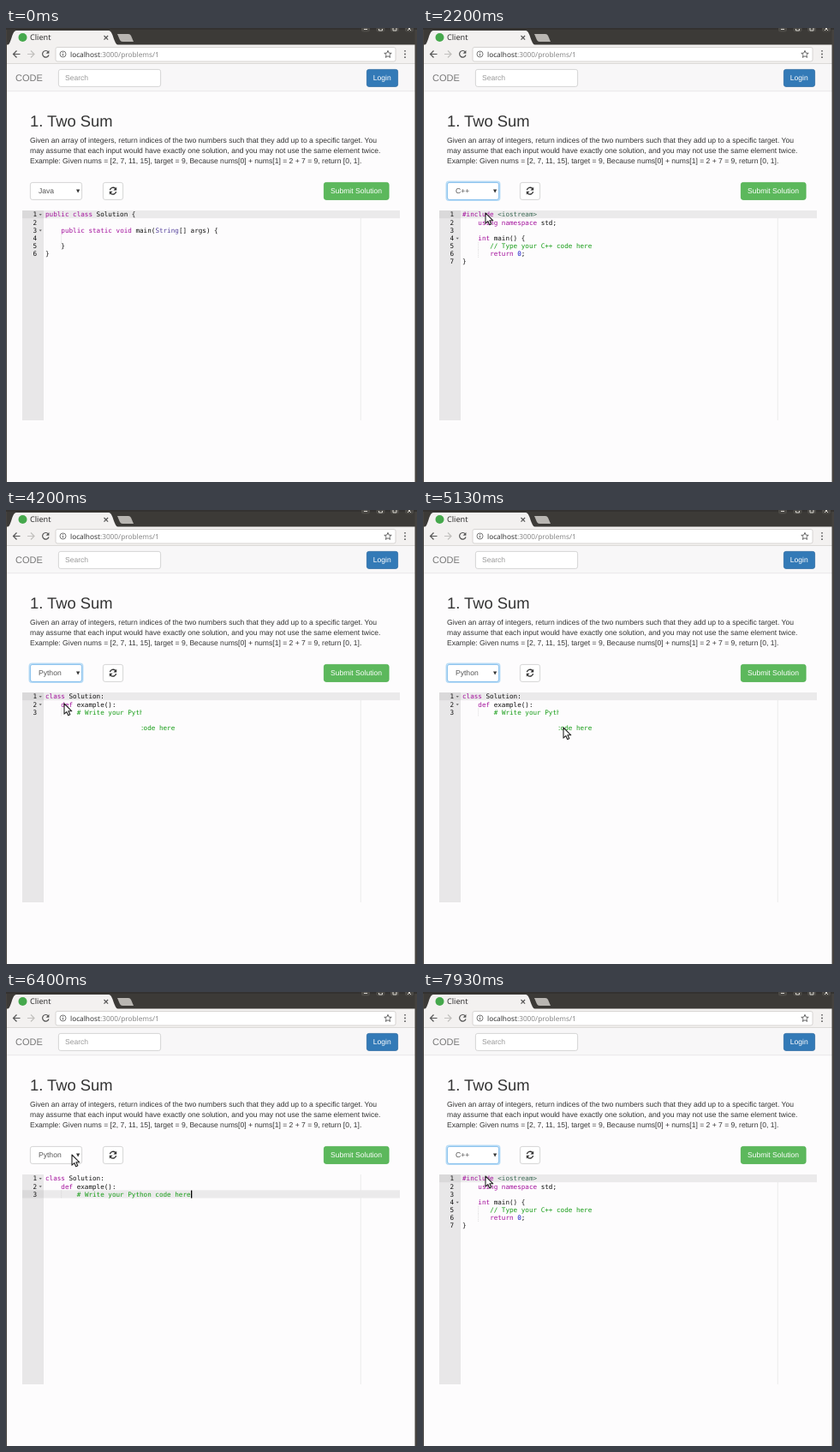
Animation, 480 px wide and 530 px high, one loop 8000 ms. Source, as an HTML page:

```html
<!DOCTYPE html>
<html>
<head>
<meta charset="utf-8">
<style>
  html, body { margin: 0; width: 100%; height: 100%; overflow: hidden; background: #fdfcfd; }
  svg { display: block; width: 480px; height: 530px; }
  text { font: 8.57px "Liberation Sans", Arial, sans-serif; fill: #333; text-rendering: geometricPrecision; white-space: pre; }
  .ui { font-family: "Noto Sans", sans-serif; }
  .code { font: 7.62px "DejaVu Sans Mono", monospace; fill: #111; }
  .key { fill: #a3109c; }
  .comment { fill: #159c15; }
  .header { fill: #3c6a55; }
  .type { fill: #54409c; }
  .num { fill: #1010c8; }
  .line { fill: none; stroke: #555; stroke-width: 1.2; }
</style>
</head>
<body>
<svg viewBox="0 0 480 530">
  <clipPath id="left"><rect y="200" width="158.5" height="270"/></clipPath>
  <clipPath id="right"><rect x="158.5" y="200" width="320" height="270"/></clipPath>
  <g id="page"></g>
  <g id="editor"></g>
  <g id="controls"></g>
  <g id="popup"></g>
  <path id="mouse" d="M0 0V12.2L2.8 9.6L4.7 13.8L6.8 12.8L4.9 8.8H8.8Z" fill="#fff" stroke="#222" stroke-width="1.1" stroke-linejoin="round"/>
</svg>
<script>
const LOOP = 8000, ROW = 9.18, COL = 4.59, CODE_X = 46, TOP = 213;
const $ = id => document.getElementById(id);
const rect = (x, y, w, h, fill, extra = '') =>
  `<rect x="${x}" y="${y}" width="${w}" height="${h}" fill="${fill}" ${extra}/>`;
const box = (x, y, w, fill, stroke, extra = '') =>
  rect(x + .4, y + .4, w - .8, 20, fill, `rx="2.4" stroke="${stroke}" stroke-width=".8" ${extra}`);
const text = (x, y, s, extra = '') => `<text x="${x}" y="${y}" ${extra}>${s}</text>`;
const path = (d, extra = '') => `<path d="${d}" ${extra}/>`;
const show = (id, on) => $(id).style.display = on ? '' : 'none';

const samples = {
  Java: { folds: [0, 2], guides: [3, 4], lines: [
    'public class Solution {', '', '    public static void main(String[] args) {', '', '    }', '}'] },
  'C++': { folds: [3], guides: [4, 5], lines: [
    '#include <iostream>', '    using namespace std;', '', '    int main() {',
    '       // Type your C++ code here', '       return 0;', '}'] },
  Python: { folds: [0, 1], guides: [2], lines: [
    'class Solution:', '    def example():', '        # Write your Python code here'] }
};
const langs = Object.keys(samples);

const tokens = /(?<comment>\/\/.*|# .*)|(?<header><\w+>)|(?<key>#include|\b(?:public|class|static|void|using|namespace|int|return|def)\b)|(?<type>String)|(?<num>\b0\b)/g;
const highlight = line => line.replace(tokens, (s, ...rest) => {
  const groups = rest.at(-1);
  const name = Object.keys(groups).find(k => groups[k]);
  return `<tspan class="${name}">${s.replace('<', '&lt;')}</tspan>`;
});

function drawCode(lang, i) {
  const { lines, folds, guides } = samples[lang];
  const base = row => 220.4 + row * ROW;
  return `<g id="code${i}">` + lines.map((line, row) => {
    const indent = line.search(/\S|$/);
    return text(36, base(row), row + 1, 'class="code" text-anchor="end"') +
      text(CODE_X + indent * COL, base(row), highlight(line.trim()), 'class="code"');
  }).join('') +
    folds.map(r => path(`M38.6 ${base(r) - 3.3}h3.2l-1.6 2z`, 'fill="#666"')).join('') +
    guides.map(r => path(`M64.6 ${TOP + r * ROW}v${ROW}`, 'stroke="#ccc" stroke-width=".6" stroke-dasharray="1 1"')).join('') +
    '</g>';
}

$('page').innerHTML =
  rect(0, 0, 480, 530, '#fdfcfd') + rect(0, 0, 480, 20, '#3c3a37') + rect(0, 0, 480, 2, '#343230') +
  // window buttons, tabs
  [415, 432.5, 449, 466].map(x => rect(x, -4, 10, 8.5, '#4c4a46', 'rx="2"')).join('') +
  path('M418 1.5h4M435.5 1v2h4v-2M452 0v3h4v-3M469 3l4-4M469-1l4 4', 'fill="none" stroke="#d8d5cf"') +
  path('M2 20C6 19 7 3 12 3H120C125 3 126 19 131 20Z', 'fill="#f3f1f0"') +
  path('M130 7h13q2 0 3 2l3 7h-13q-2 0-3-2z', 'fill="#b9b6b2"') +
  '<circle cx="19.5" cy="11" r="5" fill="#45a84c"/>' +
  text(28, 14.3, 'Client', 'class="ui" style="font-size:9.1px"') +
  path('M114.5 9l4.6 4.6m0-4.6l-4.6 4.6', 'class="line"') +
  // toolbar
  rect(0, 19.5, 480, 22, '#f3f1f0') +
  path('M16.5 30.5H8.5m4-4l-4 4l4 4', 'class="line"') +
  path('M25 30.5h8m-4-4l4 4l-4 4', 'class="line" style="stroke:#c2c0be"') +
  path('M49.4 28A3.8 3.8 0 1 0 50 31.5', 'class="line"') + path('M50.4 26v3.8h-3.8z', 'fill="#555"') +
  rect(58, 22.5, 397, 16.5, '#fff', 'rx="2" stroke="#cfccc9" stroke-width=".8"') +
  '<circle cx="66.5" cy="30.5" r="3.5" class="line" style="stroke-width:.8"/>' +
  path('M66.5 30v2.5m0-4.3v1', 'class="line" style="stroke-width:.9"') +
  text(75, 33.6, 'localhost<tspan fill="#888">:3000/problems/1</tspan>', 'class="ui" style="font-size:8.27px"') +
  path('M446 26.4l1.2 2.8 3 .2-2.3 2 .7 3-2.6-1.6-2.6 1.6.7-3-2.3-2 3-.2z', 'class="line" style="stroke-width:.9"') +
  [26.8, 30.5, 34.2].map(y => `<circle cx="466" cy="${y}" r=".9" fill="#555"/>`).join('') +
  // site header
  rect(0, 41, 480, 33, '#f8f7f8') + rect(0, 41, 480, .8, '#d5d2d0') + rect(0, 73.4, 480, .8, '#e4e3e4') +
  text(11, 62, 'CODE', 'style="font-size:11px;fill:#777"') +
  box(61, 48, 120, '#fff', '#ccc') + text(69, 61.3, 'Search', 'style="fill:#999"') +
  box(421, 48, 37, '#337ab7', '#2e6da4') + text(428.8, 61.3, 'Login', 'style="fill:#fff"') +
  // problem statement
  text(28, 115.4, '1. Two Sum', 'style="font-size:18.36px"') +
  ['Given an array of integers, return indices of the two numbers such that they add up to a specific target. You',
   'may assume that each input would have exactly one solution, and you may not use the same element twice.',
   'Example: Given nums = [2, 7, 11, 15], target = 9, Because nums[0] + nums[1] = 2 + 7 = 9, return [0, 1].']
    .map((s, i) => text(28, 134 + i * 12.24, s)).join('') +
  rect(0, 2, 1, 528, '#45423f') + rect(477.5, 2, 2.5, 528, '#45423f');

$('editor').innerHTML =
  rect(19, TOP, 25, 245, '#e8e7e8') + path(`M414.3 ${TOP}v245`, 'stroke="#e8e8e8" stroke-width=".8"') +
  `<g id="active">${rect(19, TOP, 25, ROW, '#dad9da')}${rect(44, TOP, 416, ROW, '#ebeaeb')}</g>` +
  langs.map(drawCode).join('') + rect(216, 231.6, 1.3, 9, '#000', 'id="caret"');

$('controls').innerHTML =
  rect(27.3, 179.3, 62.4, 22, 'none', 'id="glow" rx="3" stroke="#b9dcf6" stroke-width="1.6"') +
  box(28, 180, 61, '#fff', '#ccc', 'id="select"') + text(38, 193.3, '', 'id="value" style="fill:#555"') +
  path('M82 188.6h4.2l-2.1 3.8z', 'fill="#333"') +
  box(113, 180, 24, '#fff', '#ccc') +
  path('M121.4 189.2A3.8 3.8 0 0 1 127.8 187.4M128.6 191.2A3.8 3.8 0 0 1 122.2 193', 'class="line" style="stroke:#333;stroke-width:1.4"') +
  path('M129.2 185.8v3.8h-3.8zM120.8 194.6v-3.8h3.8z', 'fill="#333"') +
  box(371, 180, 76.5, '#5cb85c', '#4cae4c') + text(379, 193.3, 'Submit Solution', 'style="fill:#fff"');

$('popup').innerHTML =
  rect(29, 202, 61.5, 34.5, '#000', 'opacity=".15"') +
  rect(28.4, 200.6, 60.8, 34, '#fff', 'stroke="#999" stroke-width=".8"') +
  rect(28.8, 201, 60, 11, '#e4643c', 'id="hover"') +
  langs.map((s, i) => text(38.5, 209.3 + i * 11, s, `id="option${i}"`)).join('');

// Pointer stops: time, x, y
const stops = [
  [70, 150, 360], [250, 150, 360], [870, 84, 203], [930, 67, 181], [1150, 79, 190], [1500, 79, 190], [1850, 73, 216],
  [2250, 73, 216], [2800, 75, 188], [3400, 75, 188], [3900, 68, 226], [4350, 68, 226], [5130, 164, 254],
  [5350, 190, 276], [5550, 196, 274], [5900, 215, 233], [6080, 215, 233], [6380, 77, 190],
  [7000, 77, 190], [7600, 73, 215], [LOOP, 73, 215]
];
function pointer(t) {
  const i = Math.max(1, stops.findIndex(s => s[0] > t));
  const [t0, x0, y0] = stops[i - 1], [t1, x1, y1] = stops[i];
  const p = Math.min(1, Math.max(0, (t - t0) / (t1 - t0))), e = p * p * (3 - 2 * p);
  return [x0 + (x1 - x0) * e, y0 + (y1 - y0) * e];
}

function draw(now) {
  const t = now % LOOP;
  const within = (a, b) => t >= a && t < b;
  const lang = t < 2000 ? 0 : t < 4050 ? 1 : t < 7850 ? 2 : 1;
  const stale = within(4050, 5950);   // right part of the editor is not repainted yet
  const editing = within(5950, 6700);
  const focused = t >= 1150 && !editing;
  const [x, y] = pointer(t);

  langs.forEach((_, i) => {
    show('code' + i, i === lang || stale && i === 1);
    $('code' + i).setAttribute('clip-path', stale ? `url(#${i === 1 ? 'right' : 'left'})` : 'none');
  });
  $('active').setAttribute('transform', `translate(0 ${within(5950, 7850) ? 2 * ROW : 0})`);
  show('caret', editing && (t - 5950) % 1000 < 530);

  $('value').textContent = langs[lang];
  $('select').setAttribute('stroke', focused ? '#66afe9' : '#ccc');
  show('glow', focused);

  show('popup', within(1150, 2000) || within(3400, 4050) || within(6700, 7850));
  const over = y > 201 ? Math.min(2, Math.floor((y - 201) / 11)) : lang;
  $('hover').setAttribute('y', 201 + over * 11);
  langs.forEach((_, i) => $('option' + i).style.fill = i === over ? '#fff' : '#444');

  show('mouse', t >= 70);
  $('mouse').setAttribute('transform', `translate(${x} ${y})`);
  requestAnimationFrame(draw);
}
draw(performance.now());
</script>
</body>
</html>
```
